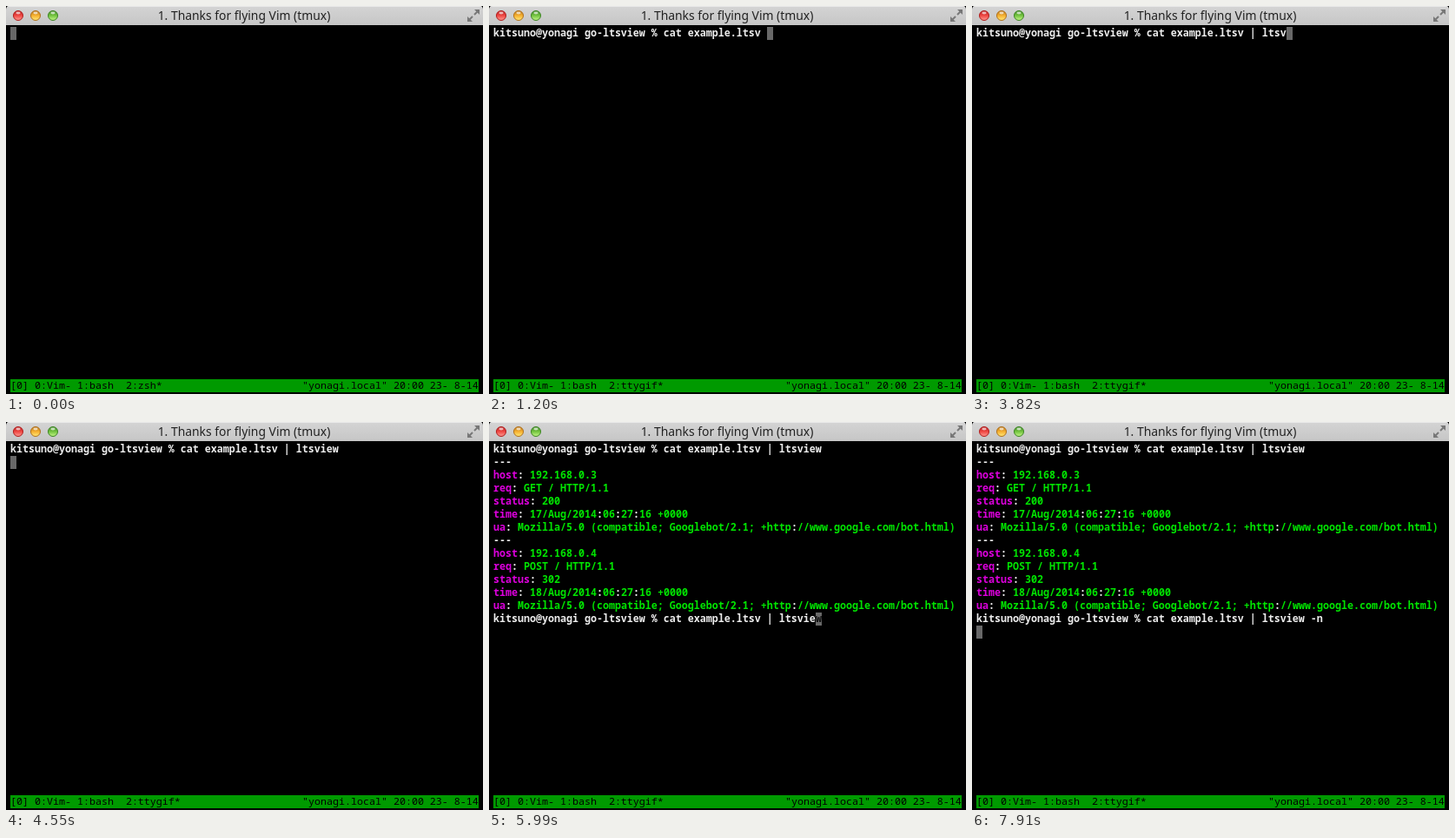
An HTML page with a canvas for the animation above (8000 ms loop, 549 px wide and 446 px high).

```html
<!DOCTYPE html>
<html>
<head>
<meta charset="utf-8">
<style>
html, body { margin: 0; width: 100%; height: 100%; overflow: hidden; background: #000; }
canvas { display: block; }
</style>
</head>
<body>
<canvas id="stage" width="549" height="446"></canvas>
<script>
const ctx = document.getElementById('stage').getContext('2d');
const LOOP = 8000, CELL = 7, LINE = 15, LEFT = 5, TOP = 24;
const WHITE = '#ececec', GREEN = '#00e400', MAGENTA = '#dc00dc', GREY = '#686868';
const PROMPT = 'kitsuno@yonagi go-ltsview % ';
const CMD = 'cat example.ltsv | ltsview';
const AGENT = 'Mozilla/5.0 (compatible; Googlebot/2.1; +http://www.google.com/bot.html)';

const record = (ip, method, status, day) => [
  '---', 'host: ' + ip, 'req: ' + method + ' / HTTP/1.1', 'status: ' + status,
  'time: ' + day + '/Aug/2014:06:27:16 +0000', 'ua: ' + AGENT
];
const OUTPUT = [
  ...record('192.168.0.3', 'GET', '200', 17),
  ...record('192.168.0.4', 'POST', '302', 18)
];

// [start ms, text after the prompt]
const FIRST = [
  [100, ''], [410, 'c'], [480, 'ca'], [660, 'cat'], [760, 'cat '], [860, 'cat e'],
  [1020, 'cat ex'], [1200, 'cat example.ltsv '], [2000, 'cat example.ltsv|'],
  [2600, 'cat example.ltsv'], [2680, 'cat example.ltsv '], [2820, 'cat example.ltsv |'],
  [3110, 'cat example.ltsv | '], [3220, 'cat example.ltsv | l'],
  [3380, 'cat example.ltsv | lt'], [3550, 'cat example.ltsv | lts'],
  [3820, 'cat example.ltsv | ltsv'], [3910, 'cat example.ltsv | ltsvi'],
  [4010, 'cat example.ltsv | ltsvie'], [4100, CMD]
];
const SECOND = [[4750, ''], [5990, CMD], [6260, CMD + ' '], [6910, CMD + ' -'], [7350, CMD + ' -n']];
const ENTER1 = 4550, PRINT = 4650, ENTER2 = 7910;

const typed = (steps, t) => steps.filter(s => s[0] <= t).pop()[1];

function rect(x, y, w, h, color) {
  ctx.fillStyle = color;
  ctx.fillRect(x, y, w, h);
}

function put(row, col, text, color, weight = 600) {
  ctx.font = weight + ' 11.667px "Noto Sans Mono", "DejaVu Sans Mono", monospace';
  ctx.textAlign = 'left';
  ctx.fillStyle = color;
  ctx.fillText(text, LEFT + col * CELL, TOP + row * LINE + 11);
}

function cursor(row, col, under = '') {
  rect(LEFT + col * CELL, TOP + row * LINE, CELL, LINE, GREY);
  put(row, col, under, '#111');
}

function light(x, dark, mid, pale) {
  const g = ctx.createLinearGradient(0, 5, 0, 17);
  g.addColorStop(0, dark);
  g.addColorStop(0.5, mid);
  g.addColorStop(1, pale);
  ctx.beginPath();
  ctx.arc(x, 11, 5.5, 0, 7);
  ctx.fillStyle = g;
  ctx.fill();
  ctx.strokeStyle = dark;
  ctx.lineWidth = 1;
  ctx.stroke();
  ctx.beginPath();
  ctx.ellipse(x, 8, 2.6, 1.4, 0, 0, 7);
  ctx.fillStyle = 'rgba(255,255,255,.65)';
  ctx.fill();
}

// Corner arrow pointing up right (s = 1) or down left (s = -1)
function arrow(x, y, s) {
  ctx.save();
  ctx.translate(x, y);
  ctx.scale(s, s);
  ctx.beginPath();
  ctx.moveTo(-6, 0);
  ctx.lineTo(0, 0);
  ctx.lineTo(0, 6);
  ctx.closePath();
  ctx.fillStyle = '#777';
  ctx.fill();
  ctx.beginPath();
  ctx.moveTo(-2, 2);
  ctx.lineTo(-6, 6);
  ctx.strokeStyle = '#777';
  ctx.lineWidth = 2;
  ctx.stroke();
  ctx.restore();
}

function titleBar() {
  const g = ctx.createLinearGradient(0, 0, 0, 22);
  g.addColorStop(0, '#d4d4d4');
  g.addColorStop(1, '#c6c6c6');
  ctx.save();
  ctx.beginPath();
  ctx.roundRect(0, 0, 549, 22, [4, 4, 0, 0]);
  ctx.clip();
  rect(0, 0, 549, 22, g);
  rect(0, 0, 549, 1, '#e8e8e8');
  ctx.restore();
  light(14, '#b01c1c', '#f04844', '#ffa49a');
  light(34, '#b0701a', '#f6b030', '#fff080');
  light(54, '#3c8424', '#74c440', '#ccfc90');
  arrow(545, 4, 1);
  arrow(531, 18, -1);
  ctx.font = '13.9px "Noto Sans", "Open Sans", sans-serif';
  ctx.textAlign = 'center';
  ctx.fillStyle = '#222';
  ctx.fillText('1. Thanks for flying Vim (tmux)', 274, 16);
}

function statusBar(job) {
  rect(LEFT, 429, 77 * CELL, LINE, '#009a00');
  put(27, 0, '[0] 0:Vim- 1:bash  2:' + job + '*', '#000', 500);
  put(27, 48, '"yonagi.local" 20:00 23- 8-14', '#000', 500);
}

// Labels are magenta, values green, colons white
function output() {
  OUTPUT.forEach((line, i) => {
    const row = i + 1;
    if (line === '---') return put(row, 0, line, WHITE);
    let col = 0;
    line.split(':').forEach((part, n) => {
      if (n) put(row, col++, ':', WHITE);
      put(row, col, part, n ? GREEN : MAGENTA);
      col += part.length;
    });
  });
}

function shell(t) {
  if (t < 100) return cursor(0, 0);
  const first = PROMPT + typed(FIRST, t);
  put(0, 0, first, WHITE);
  if (t < ENTER1) return cursor(0, first.length);
  if (t < PRINT) return cursor(1, 0);
  output();
  if (t < 4750) return cursor(13, 0);
  const second = PROMPT + typed(SECOND, t);
  put(13, 0, second, WHITE);
  if (t >= ENTER2) return cursor(14, 0);
  if (t >= 5990 && t < 6130) return cursor(13, second.length - 1, 'w');
  cursor(13, second.length);
}

function draw(now) {
  const t = now % LOOP;
  rect(0, 0, 549, 446, '#000');
  titleBar();
  shell(t);
  statusBar(t < 100 ? 'zsh' : 'ttygif');
}

const start = performance.now();
function tick() {
  draw(performance.now() - start);
  requestAnimationFrame(tick);
}
tick();
</script>
</body>
</html>
```
